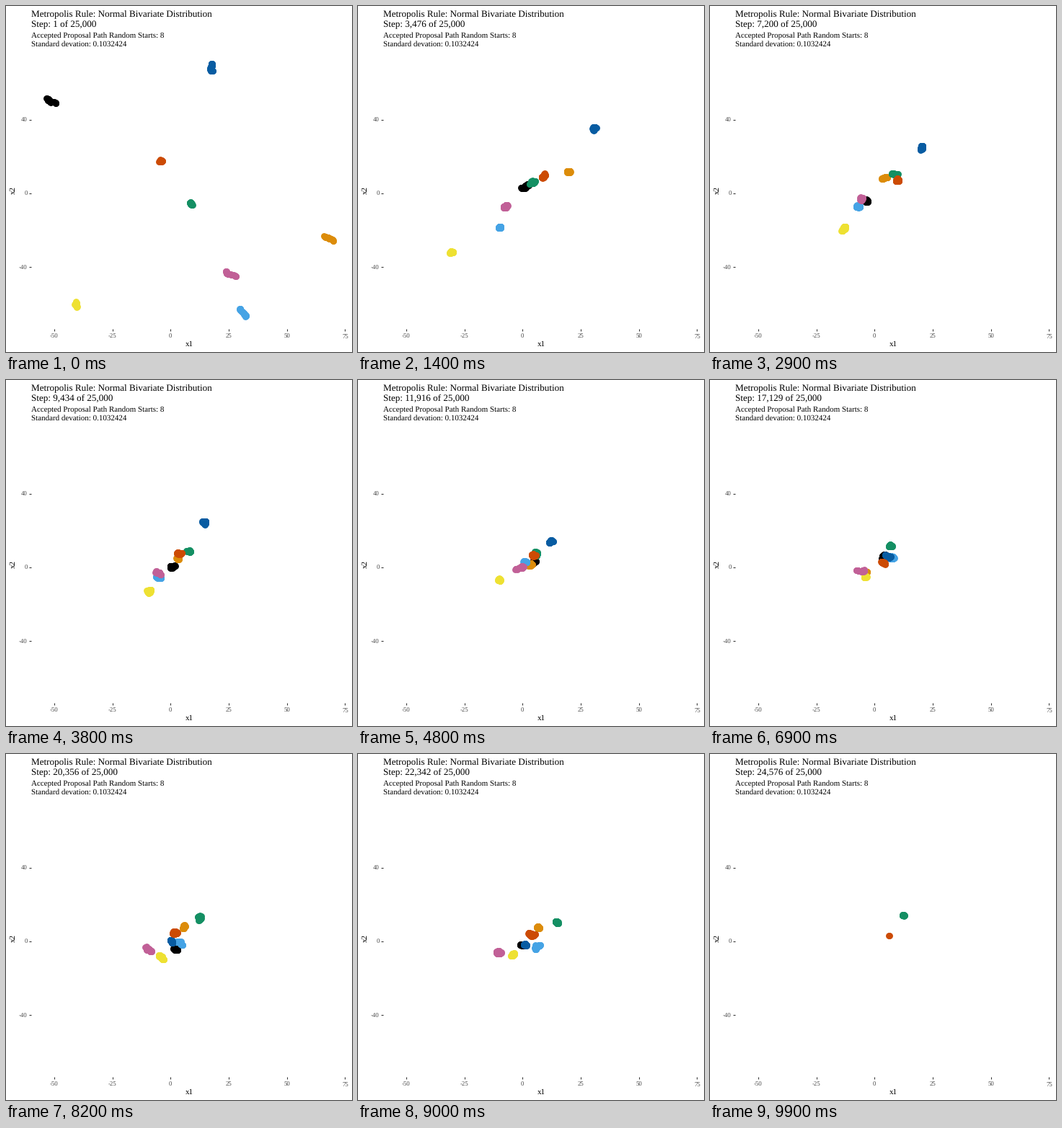
A matplotlib script that plays this animation: 480 px wide and 480 px high, repeating every 10 s.

```python
import numpy as np
import matplotlib.pyplot as plt
from matplotlib.animation import FuncAnimation

SIZE, DPI = 480, 80
FRAMES, LOOP_MS = 100, 10000
LAST_STEP = 24576
SUB = 60                    # path samples per frame
DOT = 8.9                   # dot diameter in pixels
PT = 72 / DPI               # points per pixel
ORIGIN = np.array([228.2, 260])
SCALE = np.array([3.228, -2.56])

plt.rcParams["font.family"] = "Liberation Serif"
plt.rcParams["text.hinting"] = "none"

# Colour, random start, then where the chain has wandered by each stop.
STOPS = np.array([0, 14, 29, 48, 69, 82, 99])
CHAINS = [
    ("#000000", (-53.7, 52), (1.2, 3.9), (-3.5, -4.3), (4.9, 3.1), (4, 6.2), (2.1, -4.3)),
    ("#dc8c0a", (70, -25.8), (20, 11.9), (4.1, 8.4), (3.3, 1.6), (-3.9, -2.7), (5.8, 7.8)),
    ("#45a3e5", (33, -66.8), (-9.7, -18.4), (-7, -7), (1, 3), (7.7, 5.5), (4, -.8)),
    ("#148f63", (9, -6), (4.3, 6), (8.8, 10.5), (6, 7.4), (6.8, 11.7), (12.6, 13), (12.3, 14.3)),
    ("#eee132", (-41, -61.3), (-30.7, -32), (-13, -18.8), (-10, -6.6), (-4, -5), (-4, -8.6)),
    ("#085ca2", (17, 70), (31, 35.5), (20.2, 24.8), (12, 14), (5.8, 6), (.4, 0)),
    ("#cc4b04", (-4.7, 18), (9, 9.4), (10, 7.2), (4.6, 6.6), (3.8, 2.5), (2, 4.7), (6.4, 3.1)),
    ("#c16097", (27, -45.3), (-7.2, -7), (-5.6, -3), (-.7, 0), (-5.5, -1.8), (-9.4, -4.5)),
]


def jitter(rng, n, sd=1.6, memory=3):
    """Mean-reverting random walk; memory is in frames."""
    keep = np.exp(-1 / (memory * SUB))
    kicks = rng.normal(0, sd * np.sqrt(1 - keep ** 2), (n, 2))
    out = np.zeros((n, 2))
    for i in range(1, n):
        out[i] = keep * out[i - 1] + kicks[i]
    return out


def walk(seed, keys):
    """Times and pixel positions of one chain."""
    keys = np.array(keys)
    stops = STOPS[:len(keys)]
    # Far starts reject more proposals, so their accepted path is shorter.
    burn = np.hypot(*(SCALE * (keys[1] - keys[0])))
    t = np.arange(0, min(99, 101 - burn / 20) + 1e-6, 1 / SUB)

    # Fast burn-in that slows down near the ridge, steady drift after it.
    first = stops[1]
    eased = np.where(t < first, first * (1 - np.clip(1 - t / first, 0, 1) ** 2.4), t)
    noise = jitter(np.random.default_rng(seed), len(t))
    path = np.empty_like(noise)
    for d in (0, 1):
        # Keep the wander centred on the key point at each stop.
        bias = [noise[np.abs(t - s) <= .5, d].mean() for s in stops]
        path[:, d] = np.interp(eased, stops, keys[:, d]) + noise[:, d] - np.interp(t, stops, bias)
    return t, ORIGIN + SCALE * path


fig = plt.figure(figsize=(SIZE / DPI, SIZE / DPI), dpi=DPI, facecolor="white")
ax = fig.add_axes([0, 0, 1, 1])
ax.set(xlim=(0, SIZE), ylim=(SIZE, 0))
ax.axis("off")


def label(x, y, s, px, color="black", ha="left", **kw):
    return ax.text(x, y, s, fontsize=px * PT, color=color, ha=ha, va="baseline", **kw)


def tick(xs, ys):
    ax.plot(xs, ys, color="#333333", lw=1.07 * PT, solid_capstyle="butt")


label(35, 14, "Metropolis Rule: Normal Bivariate Distribution", 13.15)
step = label(35, 28, "", 13.15)
label(35, 44, "Accepted Proposal Path Random Starts: 8", 11)
label(35, 56, "Standard devation: 0.1032424", 11)
label(254.5, 472, "x1", 11, ha="center")
label(13, 255.5, "x2", 11, ha="center", rotation=90, rotation_mode="anchor")

for v in range(-50, 76, 25):
    x = ORIGIN[0] + SCALE[0] * v
    tick([x, x], [448.3, 451])
    label(x, 461, str(v), 8.8, "#4d4d4d", "center")
for v in (-40, 0, 40):
    y = ORIGIN[1] + SCALE[1] * v
    tick([32, 34.8], [y, y])
    label(29.8, y + 3.2, str(v), 8.8, "#4d4d4d", "right")

trails = []
for k, (color, *keys) in enumerate(CHAINS):
    dots, = ax.plot([], [], "o", ms=DOT * PT, mew=0, color=color, zorder=5 + k)
    trails.append((dots, *walk(k, keys)))


def draw(i):
    step.set_text(f"Step: {round(1 + (LAST_STEP - 1) * i / (FRAMES - 1)):,} of 25,000")
    for dots, t, path in trails:
        dots.set_data(*path[np.abs(t - i) <= .5].T)
    return [step, *(trail[0] for trail in trails)]


anim = FuncAnimation(fig, draw, frames=FRAMES, interval=LOOP_MS / FRAMES,
                     init_func=lambda: draw(0), repeat=True)
plt.show()
```
